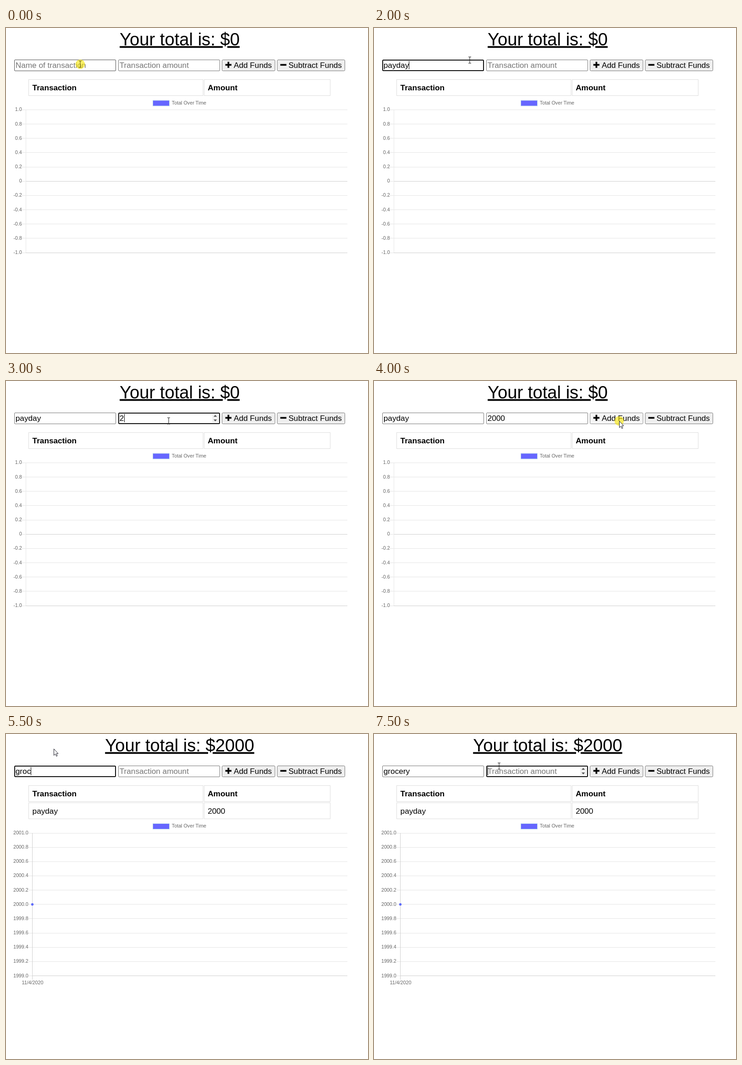
Write an HTML page that moves like this. It is 790 by 709 pixels and loops after 8000 ms.

```html
<!DOCTYPE html>
<html lang="en">
<head>
<meta charset="utf-8">
<title>Budget tracker</title>
<style>
  html, body { margin: 0; width: 100%; height: 100%; overflow: hidden; background: #fff; }
  svg { display: block; width: 790px; height: 709px; }
  text { font: 17.2px "Liberation Sans", Arial, sans-serif; white-space: pre; }
  .title { font-size: 38.2px; text-decoration: underline; text-anchor: middle; }
  .head { font-weight: bold; }
  .hint { fill: #757575; }
  .small { font-size: 10.75px; fill: #666; }
  .end { text-anchor: end; }
  .mid { text-anchor: middle; }
  .crisp { shape-rendering: crispEdges; }
</style>
</head>
<body>
<svg id="stage" viewBox="0 0 790 709" xmlns="http://www.w3.org/2000/svg"></svg>
<script>
const stage = document.getElementById('stage');
const STEP = 500;

// One entry per half second; each overrides the values before it.
const changes = [
  { name: '', amount: '', focus: 0, hover: 1, cursor: 'beam', x: 162, y: 79, halo: true, saved: false },
  { focus: 1, x: 209, y: 70, halo: false },
  { name: 'p' },
  { name: 'pay' },
  { name: 'payday' },
  { hover: 2, x: 355, y: 87, halo: true },
  { focus: 2, amount: '2', halo: false },
  { amount: '2000' },
  { focus: 0, hover: 3, cursor: 'arrow', x: 535, y: 87, halo: true },
  { name: '', amount: '', hover: 1, cursor: 'beam', x: 62, y: 80, saved: true },
  { name: 'g', focus: 1, hover: 0, cursor: 'arrow', x: 104, y: 32, halo: false },
  { name: 'groc' },
  { name: 'grocer' },
  { name: 'grocery' },
  { focus: 0, x: 266, y: 65, halo: true },
  { focus: 2, hover: 2, cursor: 'beam', x: 273, y: 70, halo: false }
];
const states = [];
changes.forEach((change, i) => states.push({ ...states[i - 1], ...change }));

const text = (x, y, value, cls = '') => `<text x="${x}" y="${y}" class="${cls}">${value}</text>`;
const rect = (x, y, w, h, attrs) => `<rect x="${x}" y="${y}" width="${w}" height="${h}" ${attrs}/>`;
const path = (d, attrs) => `<path d="${d}" ${attrs}/>`;
const hLine = (x1, x2, y, color) => rect(x1, y, x2 - x1, 1, `fill="${color}" class="crisp"`);
const vLine = (x, y1, y2, color) => rect(x, y1, 1, y2 - y1, `fill="${color}" class="crisp"`);

const ruler = document.createElement('canvas').getContext('2d');
ruler.font = '17.2px "Liberation Sans", Arial, sans-serif';

function field(x, textX, value, hint, focused, hovered, spinner) {
  const border = focused
    ? rect(x + 1, 70, 220, 23, 'rx="1.5" fill="#fff" stroke="#101010" stroke-width="2"')
    : rect(x + .5, 69.5, 221, 24, `rx="1.5" fill="#fff" stroke="${hovered ? '#4f4f4f' : '#767676'}"`);
  const caretX = Math.round(textX + ruler.measureText(value).width + .25);
  return border
    + text(textX, 87, value || hint, value ? '' : 'hint')
    + (focused ? vLine(caretX, 72, 90, '#000') : '')
    + (spinner ? rect(450, 72, 14, 19, 'fill="#f1f1f1"')
      + path('M453 78h7.4l-3.7-4zM453 84h7.4l-3.7 4z', 'fill="#505050"') : '');
}

function button(x, w, textX, label, pressed, icon) {
  return rect(x, 69.5, w, 24, `rx="2" fill="${pressed ? '#f5f5f5' : '#efefef'}" stroke="${pressed ? '#8d8d8d' : '#767676'}"`)
    + path(icon, 'stroke="#000" stroke-width="3.7" stroke-linejoin="round" fill="none"')
    + text(textX, 87, label);
}

function tableRow(y, left, right, cls) {
  const box = 'fill="none" stroke="#ddd"';
  return rect(49.5, y + .5, 380.5, 35, box) + rect(432.5, y + .5, 275, 35, box)
    + text(57.6, y + 24, left, cls) + text(440.2, y + 24, right, cls);
}

function chart(saved) {
  const top = saved ? 215.5 : 178;
  const axis = saved ? 57 : 43;
  const base = saved ? 2000 : 0;
  const bottom = top + 311.6;
  let out = rect(320.5, top - 20, 36, 12, 'fill="#66f" stroke="#b9d9ea"')
    + text(361.8, top - 11.2, 'Total Over Time', 'small');
  for (let i = 0; i <= 10; i++) {
    const y = top + i * 31.16;
    const value = base + (5 - i) / 5;
    const dark = i === 10 || value === 0;
    out += hLine(axis - 8, axis, Math.round(y), '#e5e5e5')
      + hLine(axis, 744.5, Math.round(y), dark ? '#cfcfcf' : '#e5e5e5')
      + text(axis - 8.2, y + 3.4, value === 0 ? '0' : value.toFixed(1), 'small end');
  }
  out += vLine(axis, Math.round(top), Math.round(bottom) + (saved ? 9 : 0), saved ? '#cfcfcf' : '#e5e5e5');
  if (saved) {
    out += `<circle cx="57.5" cy="371.7" r="2.7" fill="#5f6cfa"/>`
      + text(58, 545.7, '11/4/2020', 'small mid');
  }
  return out;
}

function pointer({ cursor, x, y, halo }) {
  const glow = halo ? `<circle cx="${x}" cy="${y}" r="10.3" fill="#f7e600" opacity=".6"/>` : '';
  const shape = cursor === 'arrow'
    ? path('M.5 .5V14.7L3.7 11.6 5.9 16.6 8 15.7 5.9 10.8H10Z', 'fill="#fff" stroke="#1c1c28" stroke-width="1"')
    : path('M-3 -7H-1L0 -6.3 1 -7H3M0 -6.3V6.3M-3 7H-1L0 6.3 1 7H3',
      `fill="none" stroke="${halo ? '#5e5618' : '#222'}" stroke-width="1.1"`);
  return glow + `<g transform="translate(${x} ${y})">${shape}</g>`;
}

function draw(s) {
  stage.innerHTML = text(379, 37.5, 'Your total is: $' + (s.saved ? 2000 : 0), 'title')
    + field(18, 20.8, s.name, 'Name of transaction', s.focus === 1, s.hover === 1, false)
    + field(245, 247.7, s.amount, 'Transaction amount', s.focus === 2, s.hover === 2, s.focus === 2 || s.hover === 2)
    + button(471.5, 115.5, 497, 'Add Funds', s.hover === 3, 'M478.7 80.4H492M485.35 73.8V87')
    + button(592, 147.5, 616.4, 'Subtract Funds', false, 'M598.6 80.4H611.9')
    + tableRow(112, 'Transaction', 'Amount', 'head')
    + (s.saved ? tableRow(149.5, 'payday', '2000') : '')
    + chart(s.saved)
    + pointer(s);
}

let shown = -1;
const start = performance.now();
function tick(now) {
  const step = Math.floor(Math.max(0, now - start) / STEP) % states.length;
  if (step !== shown) draw(states[shown = step]);
  requestAnimationFrame(tick);
}
tick(start);
</script>
</body>
</html>
```
